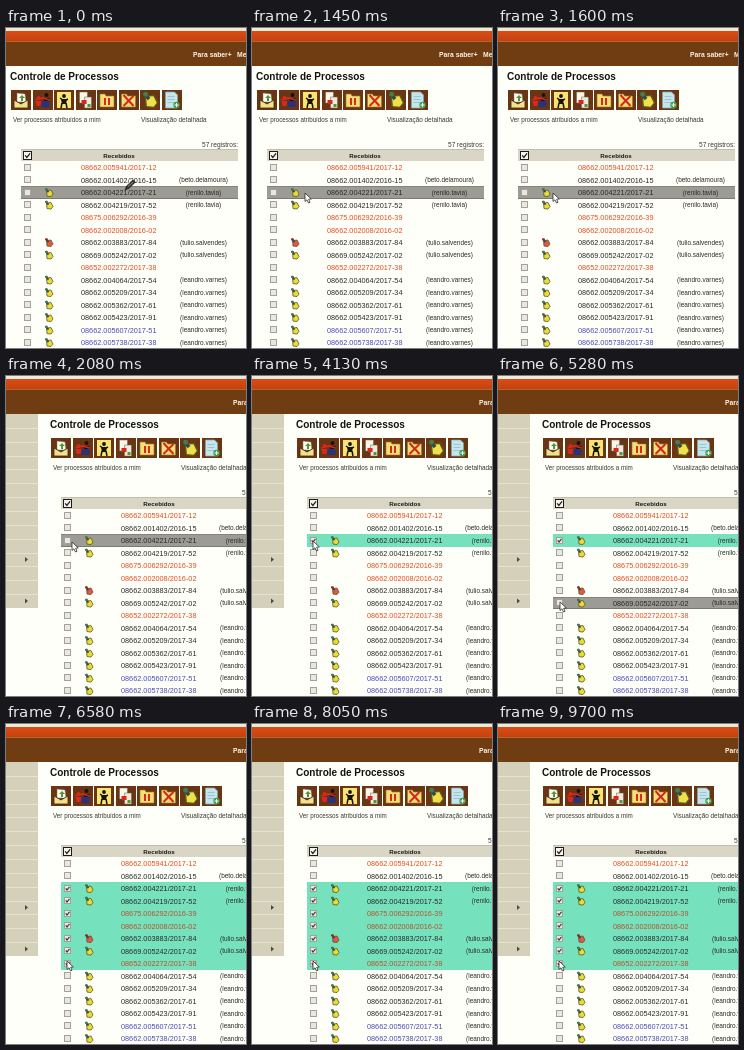
An HTML page with a canvas that plays this animation: 240 px wide and 320 px high, repeating every 9770 ms.

```html
<!DOCTYPE html>
<html lang="pt">
<head>
<meta charset="utf-8">
<title>Controle de Processos</title>
<style>
html, body { margin: 0; width: 100%; height: 100%; overflow: hidden; background: #fffffa; }
canvas { display: block; width: 240px; height: 320px; }
</style>
</head>
<body>
<canvas id="stage" width="240" height="320"></canvas>
<script>
const ctx = document.getElementById('stage').getContext('2d');
const LOOP = 9770, ROW_TOP = 133.3, ROW_H = 12.5, LEFT = 55, RIGHT = 272;
const FONT = '"Liberation Sans", Arial, sans-serif';
const DARK = '#2b2a28', ORANGE = '#e04e20', BLUE = '#4a4ab4';
const PAN_START = 1480, PAN_END = 2020;
const FIRST_CLICK = 3400, SHIFT_CLICK = 6560;

// number, text colour, note colour, person
const YELLOW = '#e9dc35', RED = '#e2574a';
const A = '(beto.delamoura)', B = '(renilo.tavia)', C = '(tulio.salvendes)', D = '(leandro.varnes)';
const rows = [
  ['08662.005941/2017-12', ORANGE],
  ['08662.001402/2016-15', DARK, null, A],
  ['08662.004221/2017-21', DARK, YELLOW, B],
  ['08662.004219/2017-52', DARK, YELLOW, B],
  ['08675.006292/2016-39', ORANGE],
  ['08662.002008/2016-02', ORANGE],
  ['08662.003883/2017-84', DARK, RED, C],
  ['08669.005242/2017-02', DARK, YELLOW, C],
  ['08652.002272/2017-38', ORANGE],
  ['08662.004064/2017-54', DARK, YELLOW, D],
  ['08662.005209/2017-34', DARK, YELLOW, D],
  ['08662.005362/2017-61', DARK, YELLOW, D],
  ['08662.005423/2017-91', DARK, YELLOW, D],
  ['08662.005607/2017-51', BLUE, YELLOW, D],
  ['08662.005738/2017-38', BLUE, YELLOW, D]
];

// pointer path in page coordinates: time, x, y
const path = [
  [0, 159, 162], [130, 159, 162], [1000, 93, 165], [PAN_START, 93, 165],
  [PAN_END, 66, 166], [2400, 66, 166], [2800, 61, 165], [4800, 61, 165],
  [5250, 62, 226], [5450, 62, 226], [5900, 61, 237], [LOOP, 61, 237]
];

const ease = u => u * u * (3 - 2 * u);
const span = (t, a, b) => ease(Math.min(1, Math.max(0, (t - a) / (b - a))));

function pointerAt(t) {
  let i = 1;
  while (i < path.length - 1 && path[i][0] < t) i++;
  const [t0, x0, y0] = path[i - 1], [t1, x1, y1] = path[i];
  const u = span(t, t0, t1);
  return { x: x0 + (x1 - x0) * u, y: y0 + (y1 - y0) * u };
}

function rect(x, y, w, h, color) {
  ctx.fillStyle = color;
  ctx.fillRect(x, y, w, h);
}

function text(s, x, y, size, color, align = 'left', weight = 'normal') {
  ctx.font = `${weight} ${size}px ${FONT}`;
  ctx.textAlign = align;
  ctx.fillStyle = color;
  ctx.fillText(s, x, y);
}

function poly(points, fill, stroke, width = 1) {
  ctx.beginPath();
  for (let i = 0; i < points.length; i += 2) ctx.lineTo(points[i], points[i + 1]);
  if (fill) {
    ctx.closePath();
    ctx.fillStyle = fill;
    ctx.fill();
  }
  if (stroke) {
    ctx.strokeStyle = stroke;
    ctx.lineWidth = width;
    ctx.stroke();
  }
}

function dot(x, y, r, color) {
  ctx.beginPath();
  ctx.arc(x, y, r, 0, Math.PI * 2);
  ctx.fillStyle = color;
  ctx.fill();
}

function at(x, y, draw) {
  ctx.save();
  ctx.translate(x, y);
  draw();
  ctx.restore();
}

function person(x, y, color) {
  dot(x, y, 1.9, color);
  poly([x - 3, y + 3, x + 3, y + 3, x + 2, y + 8, x - 2, y + 8], color);
}

function note(color, scale) {
  ctx.scale(scale, scale);
  poly([-2.5, -2, 2, -2.5, 4, 1.5, 2, 4, -2, 3.5], color, '#5c5620', 0.8);
  poly([-3.5, -4, -0.5, -0.5], null, '#2f4a48', 1.8);
  dot(-2.3, -3, 1.3, color === RED ? '#a42c22' : '#4c7a4a');
}

function folder() {
  poly([-7, -6, -2, -6, -1, -4, 7, -4, 7, 7, -7, 7], '#f6dd78', '#9c7a25', 0.6);
}

const icons = [
  () => {
    poly([-4, -7, 4, -6, 5, 2, -4, 2], '#fffdf0', '#777', 0.5);
    poly([-2, -2, 1, -5, 4, -2, 2, -2, 2, 1, 0, 1, 0, -2], '#4c9a35');
    poly([-7, 0, 0, 4, 7, 0, 7, 8, -7, 8], '#f4e08c', '#3a2a14', 0.8);
  },
  () => {
    person(-4, -2, '#d9281c');
    person(4, -5, '#16110e');
    rect(-1, 1, 8, 6, '#27337c');
    poly([-7, 0, 0, -2, 7, 0], null, '#d9281c', 1.8);
  },
  () => {
    rect(-7, -8, 14, 16, '#f7e473');
    person(0, -4, '#17130f');
    poly([-4, -2, 0, 1, 4, -1], null, '#17130f', 1.4);
    poly([-2, 3, -3, 8], null, '#17130f', 1.5);
    poly([2, 3, 3, 8], null, '#17130f', 1.5);
  },
  () => {
    poly([-6, -8, 2, -8, 2, 3, -6, 3], '#fbf7e8', '#6b5b4a', 0.5);
    poly([-1, -3, 6, -3, 6, 8, -1, 8], '#eeeadc', '#6b5b4a', 0.5);
    rect(-4, 0, 5, 4, '#d2281e');
    rect(2, 4, 3, 3, '#4c9a35');
  },
  () => {
    folder();
    rect(-3, -2, 2, 7, '#d22c1e');
    rect(1, -2, 2, 7, '#d22c1e');
  },
  () => {
    folder();
    poly([-5, -5, 5, 6], null, '#d2281e', 2);
    poly([-5, 6, 5, -4], null, '#d2281e', 2);
  },
  () => note('#f0e14a', 1.9),
  () => {
    poly([-6, -8, 3, -8, 6, -5, 6, 8, -6, 8], '#c4e5ec', '#7fa9b7', 0.7);
    for (let y = -4; y < 3; y += 3) rect(-4, y, 7, 0.8, '#93bdca');
    dot(5, 5, 3.2, '#43a04a');
    rect(3, 4.5, 4, 1, '#fff');
    rect(4.5, 3, 1, 4, '#fff');
  }
];

function header() {
  rect(0, 0, 290, 3, '#f0ead8');
  const g = ctx.createLinearGradient(0, 3, 0, 13);
  g.addColorStop(0, '#dc4c14');
  g.addColorStop(1, '#c4420f');
  rect(0, 3, 290, 10, g);
  rect(0, 13, 290, 1, '#b3682f');
  rect(0, 14, 290, 24, '#703c12');
  text('Para saber+', 227, 29.3, 6.8, '#fff6e8', 'left', 'bold');
  text('Menu', 271, 29.3, 6.8, '#fff6e8', 'left', 'bold');
}

function sidebar() {
  const step = 194 / 14;
  rect(0, 38, 32, 194, '#d4d0b9');
  for (let i = 1; i < 14; i++) rect(0, Math.round(38 + i * step), 32, 1, '#e6e2d0');
  for (const i of [10, 13]) {
    const y = 38 + (i + 0.5) * step;
    poly([19, y - 2.5, 22, y, 19, y + 2.5], '#4d4a40');
  }
}

function checkbox(x, y, size, edge, fill, tick) {
  rect(x, y, size, size, edge);
  rect(x + 1, y + 1, size - 2, size - 2, fill);
  if (tick) {
    const s = size / 7;
    poly([x + 1.7 * s, y + 3.4 * s, x + 3 * s, y + 5 * s, x + 5.5 * s, y + 1.8 * s], null, tick, 1.2);
  }
}

function table(t, hover) {
  rect(LEFT, 121, RIGHT - LEFT, 12, '#d9d6c6');
  rect(LEFT, 121, RIGHT - LEFT, 1, '#c3bfae');
  checkbox(57, 123, 9, '#1c1c1c', '#f5f3ea', '#1d1d1d');
  text('Recebidos', 153, 130.4, 6.2, '#1d1c1a', 'center', 'bold');

  rows.forEach(([number, color, pin, who], i) => {
    const top = ROW_TOP + i * ROW_H, mid = top + ROW_H / 2;
    const checked = i === 2 ? t >= FIRST_CLICK : i > 2 && i < 9 && t >= SHIFT_CLICK;
    const y0 = Math.round(top), h = Math.round(top + ROW_H) - y0;
    if (checked) rect(LEFT, y0, RIGHT - LEFT, h, '#76e2bd');
    else if (i === hover) {
      rect(LEFT, y0, RIGHT - LEFT, h, '#9c9b94');
      rect(LEFT, y0, RIGHT - LEFT, 1, '#84837c');
      rect(LEFT, y0 + h - 1, RIGHT - LEFT, 1, '#7a7972');
    }
    checkbox(58, Math.round(mid - 4), 7, '#a3a199', '#e9e7de', checked && '#3c3c3a');
    if (pin) at(83, mid, () => note(pin, 1));
    text(number, 115, mid + 2.5, 7.3, checked && color === ORANGE ? '#b9502c' : color);
    if (who) text(who, 237.5, mid + 2.2, 6.45, DARK, 'center');
  });
}

function pointer(x, y) {
  at(Math.round(x), Math.round(y), () => {
    if (x > 112) {
      poly([0, 0, 1.5, -4, 8, -10, 10.5, -8, 4, -1.5], '#34332f', '#1d1c1a', 0.6);
      poly([3, -3.5, 8, -8], null, '#aaa99f', 0.8);
    } else {
      poly([0, 0, 0, 8.5, 2, 6.8, 3.5, 10, 5, 9.3, 3.7, 6.2, 6.3, 6], '#ffffff', '#2c2a28', 0.8);
    }
  });
}

function draw(t) {
  const p = pointerAt(t);
  const pan = Math.round(-40 * (1 - span(t, PAN_START, PAN_END)));
  rect(0, 0, 240, 320, '#fffffa');
  at(pan, 0, () => {
    header();
    sidebar();
    text('Controle de Processos', 44, 52.2, 10, '#14130f', 'left', 'bold');
    icons.forEach((icon, i) => {
      const x = 55 + i * 21.5;
      rect(Math.round(x - 10), 62, 20, 20, '#6a3512');
      at(x, 72, icon);
    });
    text('Ver processos atribuídos a mim', 47, 94.4, 6.27, '#3a3832');
    text('Visualização detalhada', 175, 94.4, 6.4, '#3a3832');
    text('57 registros:', 236, 118.8, 6.55, '#3a3832');
    table(t, Math.floor((p.y - ROW_TOP) / ROW_H));
    pointer(p.x, p.y);
  });
}

const start = performance.now();
function tick() {
  draw((performance.now() - start) % LOOP);
  requestAnimationFrame(tick);
}
tick();
</script>
</body>
</html>
```
